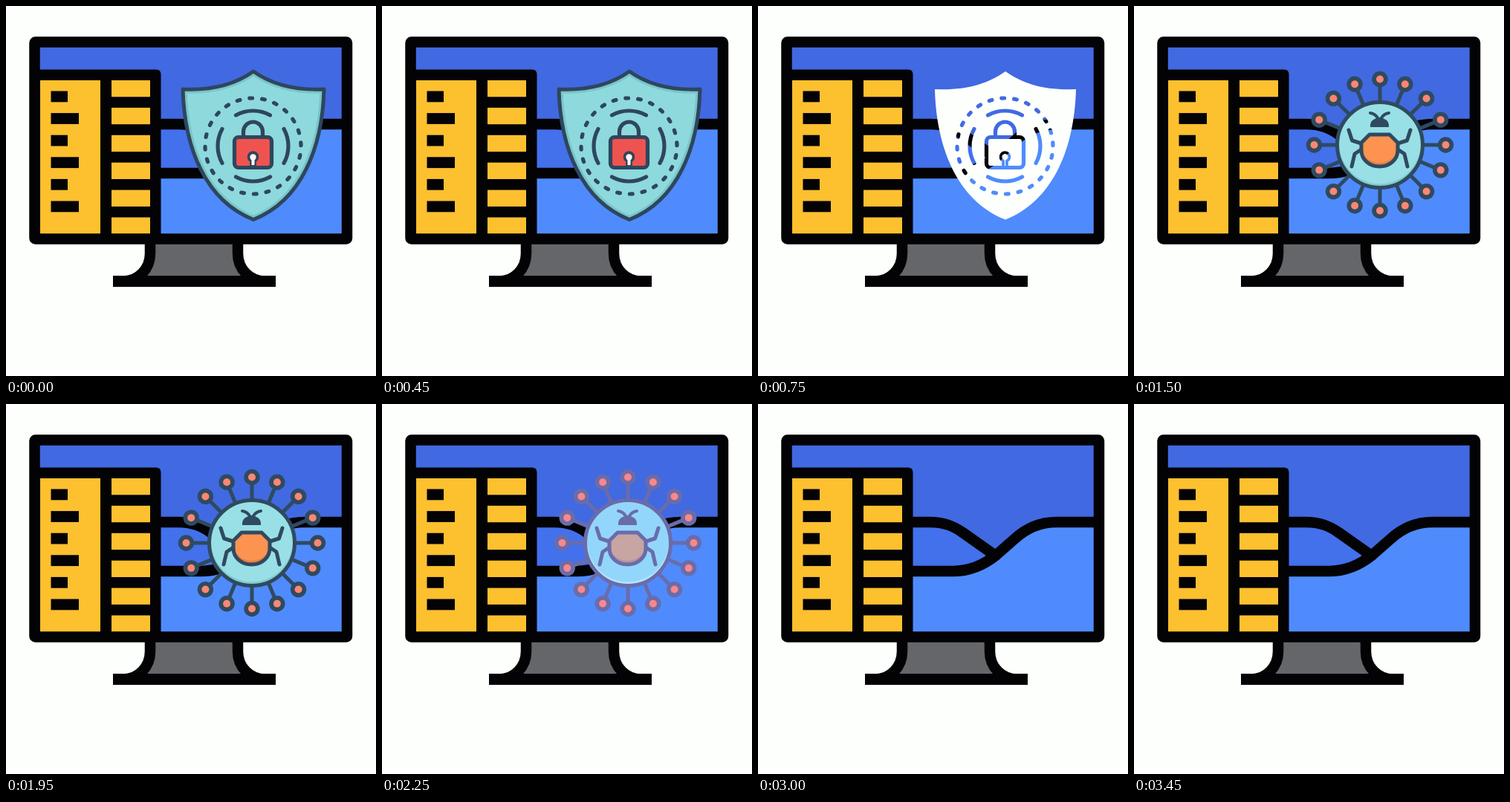
These frames come from a looping animation (498x498 px, 3.75 s). An HTML page:

```html
<!DOCTYPE html>
<html lang="en">
<head>
<meta charset="utf-8">
<title>Screen protection</title>
<style>
html, body { margin: 0; width: 100%; height: 100%; overflow: hidden; background: #fdfffc; }
svg { display: block; width: 100vw; height: 100vh; }
.line { fill: none; stroke: #030305; stroke-width: 14.5; }
#virus { --ink: #2f4a60; --cell: #98e0e5; --rim: #80c9cf; --body: #fc9350; --shade: #e77f45; --dot: #ff8673; }
#virus.faded { --ink: #6a6caa; --cell: #93d6fc; --rim: #b4e5fc; --body: #c6a5a3; --shade: #b3949b; --dot: #fb8789; }
.ink { fill: none; stroke: var(--ink); stroke-width: 5; stroke-linecap: round; stroke-linejoin: round; }
.marks { fill: none; stroke-width: 5.2; stroke-linecap: round; stroke-linejoin: round; }
</style>
</head>
<body>
<svg viewBox="0 0 498 498">
  <defs>
    <path id="shape" d="M333 88C309 105 279 114 238 112C240 190 268 262 333 287.5C398 262 426 190 428 112C387 114 357 105 333 88Z"/>
    <g id="emblem" class="marks"></g>
    <mask id="holes" maskUnits="userSpaceOnUse" x="0" y="0" width="498" height="498">
      <use href="#shape" fill="#fff"/>
      <use href="#emblem" stroke="#000"/>
    </mask>
    <clipPath id="inside"><use href="#shape"/></clipPath>
    <clipPath id="belly"><path id="bug" d="M317 173H344L355 184V194C355 207 344 216 330.5 216S306 207 306 194V184Z"/></clipPath>
  </defs>

  <path d="M194 314H312V333C312 350 318 359 324 366H182C189 359 194 350 194 333Z" fill="#65666a"/>
  <path class="line" d="M194 314V333C194 354 178 370.5 158 370.5M312 314V333C312 354 328 370.5 349 370.5"/>
  <path d="M144 363H363V378H144Z" fill="#030305"/>

  <rect x="38.5" y="48.5" width="421" height="265" fill="#4169e1"/>
  <path d="M208 159H232C250 159 263 164 277 174L318 203L262 225H208Z" fill="#4370eb"/>
  <path d="M201 225H262C287 225 305 216 321 203L345 182C361 167 380 159 402 159H456V312H201Z" fill="#4f8bfd"/>
  <path class="line" d="M201 159H232C250 159 263 164 277 174L318 203"/>
  <path class="line" d="M201 225H262C287 225 305 216 321 203L345 182C361 167 380 159 402 159H456"/>
  <path d="M40 85.5H202Q208.5 85.5 208.5 92V312H40Z" fill="#030305"/>
  <path d="M46 100H127V308H46Z" fill="#fdc02f"/>
  <g id="cells"></g>
  <rect class="line" x="38.5" y="48.5" width="420.5" height="265" rx="1" stroke-linejoin="round"/>

  <g id="shield">
    <use href="#shape" fill="#8ed9dc"/>
    <g clip-path="url(#inside)">
      <use href="#shape" fill="none" stroke="#79c5ca" stroke-width="11"/>
    </g>
    <use href="#shape" fill="none" stroke="#2e465e" stroke-width="5" stroke-linejoin="round"/>
    <rect x="308" y="177" width="49" height="40" rx="5" fill="#ef5350"/>
    <use href="#emblem" stroke="#2e465e"/>
    <path d="M332.5 204V214" stroke="#fff" stroke-width="4"/>
    <circle cx="332.5" cy="203.5" r="4" fill="#fff"/>
  </g>
  <rect id="cutout" width="498" height="498" fill="#fdfffd" mask="url(#holes)"/>

  <g id="virus">
    <g id="spikes"></g>
    <circle cx="331" cy="187" r="57.5" fill="var(--rim)"/>
    <circle cx="331" cy="184.5" r="55" fill="var(--cell)"/>
    <circle cx="331" cy="187" r="57.5" class="ink"/>
    <path class="ink" d="M289 167L293.5 181L306 185M306 193L297 199L293 216M372 167L367.5 181L355 185M355 193L364 199L368 216"/>
    <use href="#bug" fill="var(--shade)"/>
    <circle cx="330.5" cy="184" r="27" fill="var(--body)" clip-path="url(#belly)"/>
    <use href="#bug" class="ink"/>
    <path d="M318 163Q317 155 324 152Q330.5 148 337 152Q344 155 343 163Z" fill="var(--ink)"/>
    <path class="ink" d="M318 144Q325 145 329 152M343 144Q336 145 332 152" style="stroke-width:4"/>
  </g>
</svg>
<script>
const $ = id => document.getElementById(id);
const polar = (cx, cy, r, deg) => {
  const a = deg * Math.PI / 180;
  return [cx + r * Math.cos(a), cy + r * Math.sin(a)].map(n => n.toFixed(2)).join(' ');
};
const arc = (r, from, to) =>
  `M${polar(332.5, 188.5, r, from)}A${r} ${r} 0 0 1 ${polar(332.5, 188.5, r, to)}`;

let cells = '';
for (let i = 0; i < 6; i++) {
  const y = 100 + i * 36.9;
  cells += `<rect x="142" y="${y}" width="52" height="22.3" fill="#fdc02f"/>`;
  cells += `<rect x="60.5" y="${114.5 + i * 29.6}" width="${i % 2 ? 37.5 : 22.5}" height="14.8" fill="#030305"/>`;
}
$('cells').innerHTML = cells;

let marks = '';
for (let i = 0; i < 24; i++) marks += arc(64.5, i * 15 - 94.2, i * 15 - 90.8);
for (let i = 0; i < 4; i++) marks += arc(47.5, i * 90 - 29, i * 90 + 29);
$('emblem').innerHTML = `<path d="${marks}"/>
  <path d="M319.5 176V169a13 13 0 0 1 26 0V176"/>
  <rect x="307.5" y="176.5" width="50" height="41" rx="5.5"/>
  <path d="M330 214V208.5A6 6 0 1 1 335 208.5V214" stroke-width="3.8"/>`;

let spikes = '';
for (let i = 0; i < 16; i++) {
  const [x, y] = polar(331, 187, 88.5, i * 22.5).split(' ');
  spikes += `<path class="ink" d="M331 187L${x} ${y}"/>
    <circle cx="${x}" cy="${y}" r="10.7" fill="var(--ink)"/>
    <circle cx="${x}" cy="${y}" r="5" fill="var(--dot)"/>`;
}
$('spikes').innerHTML = spikes;

const STEP = 750, LOOP = 3750;
const show = (id, on) => { $(id).style.display = on ? '' : 'none'; };

function draw(ms) {
  const scene = Math.floor(ms % LOOP / STEP);
  show('shield', scene === 0);
  show('cutout', scene === 1);
  show('virus', scene === 2 || scene === 3);
  $('virus').classList.toggle('faded', scene === 3);
}

const start = performance.now();
function tick() {
  draw(performance.now() - start);
  requestAnimationFrame(tick);
}
tick();
</script>
</body>
</html>
```
